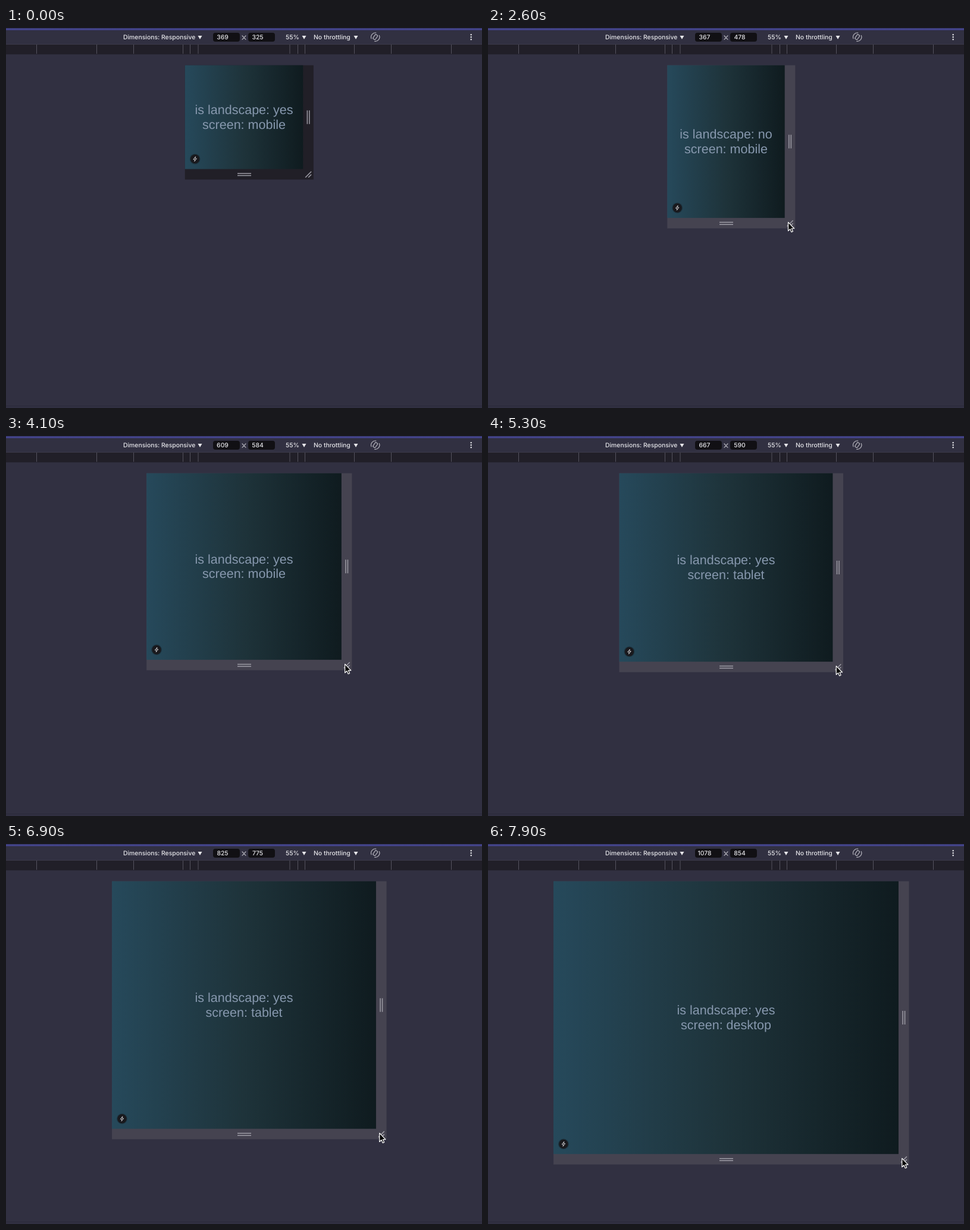
Write an HTML page that moves like this. It is 800 by 640 pixels and loops after 8000 ms.

```html
<!DOCTYPE html>
<html lang="en">
<head>
<meta charset="utf-8">
<title>Responsive viewport</title>
<style>
  html, body { margin: 0; width: 100%; height: 100%; overflow: hidden; background: #313041; }
  svg { display: block; width: 800px; height: 640px; }
  text { text-rendering: geometricPrecision; }
  .ui { font: 500 10.4px Inter, Roboto, sans-serif; fill: #e6e6ea; }
  .mid { text-anchor: middle; }
  .msg { font: 21.52px "Liberation Sans", Arial, sans-serif; fill: #8798ae; text-anchor: middle; }
  .grip { stroke: #9d9ca5; stroke-width: 1.5; fill: none; }
  .icon { stroke: #b4b3bc; stroke-width: 1.2; fill: none; stroke-linecap: round; }
</style>
</head>
<body>
<svg viewBox="0 0 800 640">
  <defs>
    <linearGradient id="strip" x2="0" y2="1">
      <stop offset="0" stop-color="#303058"/>
      <stop offset=".55" stop-color="#4a4b9c"/>
      <stop offset="1" stop-color="#353562"/>
    </linearGradient>
    <linearGradient id="page">
      <stop offset="0" stop-color="#26495b"/>
      <stop offset=".5" stop-color="#1e333a"/>
      <stop offset="1" stop-color="#0f1b1f"/>
    </linearGradient>
  </defs>

  <rect width="800" height="640" fill="#313041"/>
  <rect y="636" width="800" height="1" fill="#2b2a39"/>
  <rect width="800" height="4" fill="url(#strip)"/>
  <rect y="27" width="800" height="17.4" fill="#211f28"/>
  <rect y="27" width="800" height="1" fill="#3b3a48"/>
  <path id="ticks" stroke="#55535f"/>

  <rect x="348" y="8" width="45" height="15" rx="4" fill="#111014"/>
  <rect x="407" y="8" width="45" height="15" rx="4" fill="#111014"/>
  <g class="ui">
    <text x="197" y="19">Dimensions: Responsive</text>
    <text x="470" y="19">55%</text>
    <text x="517" y="19">No throttling</text>
    <text id="wNum" class="mid" x="364" y="19"></text>
    <text id="hNum" class="mid" x="423" y="19"></text>
    <path d="M322.5 13h7l-3.5 6zM497.5 13h7l-3.5 6zM584.5 13h7l-3.5 6z"/>
    <circle cx="781.7" cy="11.2" r="1.2"/>
    <circle cx="781.7" cy="15.2" r="1.2"/>
    <circle cx="781.7" cy="19.2" r="1.2"/>
  </g>
  <path class="icon" d="M397 13l6 6.4M403 13l-6 6.4"/>
  <g class="icon" transform="translate(620.7 15.2)">
    <rect x="-2.3" y="-4.3" width="4.6" height="8.6" rx="1" transform="rotate(35)"/>
    <path d="M1 -7.1A7.2 7.2 0 0 0 -6.7 2.6M-1 7.1A7.2 7.2 0 0 0 6.7 -2.6"/>
  </g>

  <path id="bars"/>
  <rect id="screen" fill="url(#page)"/>
  <text id="line1" class="msg" x="400"></text>
  <text id="line2" class="msg" x="400"></text>
  <g id="badge">
    <circle r="9" fill="#000" opacity=".22"/>
    <circle r="7.7" fill="#19191d"/>
    <path d="M.9 -4L-2.8 .7H-.2L-.9 4L2.8 -.7H.2Z" fill="none" stroke="#d5d5d9" stroke-width=".9" stroke-linejoin="round"/>
  </g>
  <path id="gripR" class="grip" d="M-1.7 -11.5v23M1.8 -11.5v23"/>
  <path id="gripB" class="grip" d="M-11 -1.7h23M-11 1.8h23"/>
  <path id="gripC" class="grip" d="M-5.3 5L4.7 -5M-.3 5L4.7 0"/>
  <path id="cursor" d="M0 0V14.6L3.3 11.5L5.5 16.5L7.9 15.4L5.7 10.6H10.2Z"
    fill="#050506" stroke="#fff" stroke-width="1.2" stroke-linejoin="round"/>
</svg>
<script>
const $ = id => document.getElementById(id);
const LOOP = 8000, STEP = 100;
const SCALE = 0.538, TOP = 62.7, BAR = 17.6, MID = 400;
const ENTER = 100, HOVER = 500, GRAB = 700;

const easeIn = p => p ** 1.3;
const easeOut = p => 1 - (1 - p) ** 1.3;
const smooth = p => p * p * (3 - 2 * p);
const progress = (t, from, to) => Math.min(1, Math.max(0, (t - from) / (to - from)));

// each drag resizes the viewport to w x h
const drags = [
  { from: 800, to: 900, w: 369, h: 326, ease: smooth },
  { from: 1580, to: 3100, w: 366, h: 530, ease: smooth },
  { from: 3200, to: 3500, w: 506, h: 572, ease: easeIn },
  { from: 3500, to: 4600, w: 667, h: 590, ease: easeOut },
  { from: 5280, to: 6100, w: 663, h: 724, ease: smooth },
  { from: 6300, to: 7300, w: 978, h: 824, ease: easeIn },
  { from: 7300, to: 7900, w: 1078, h: 854, ease: easeOut }
];

function sizeAt(t) {
  let w = 369, h = 325;
  for (const d of drags) {
    const p = d.ease(progress(t, d.from, d.to));
    w += (d.w - w) * p;
    h += (d.h - h) * p;
  }
  return [Math.round(w), Math.round(h)];
}

function set(id, attrs) {
  for (const name in attrs) $(id).setAttribute(name, attrs[name]);
}
const move = (id, x, y) => set(id, { transform: `translate(${x} ${y})` });

function draw(t) {
  const [w, h] = sizeAt(t);
  const vw = w * SCALE, vh = h * SCALE;
  const left = MID - vw / 2, right = MID + vw / 2;
  const bottom = TOP + vh, center = TOP + vh / 2;

  $('wNum').textContent = w;
  $('hNum').textContent = h;
  $('line1').textContent = 'is landscape: ' + (w >= h ? 'yes' : 'no');
  $('line2').textContent = 'screen: ' + (w < 640 ? 'mobile' : w < 1024 ? 'tablet' : 'desktop');
  set('line1', { y: center - 5 });
  set('line2', { y: center + 19.7 });

  set('bars', {
    d: `M${left} ${TOP}H${right + BAR}V${bottom + BAR}H${left}Z`,
    fill: t < HOVER ? '#211f27' : '#454350'
  });
  set('screen', { x: left, y: TOP, width: vw, height: vh });
  move('badge', left + 16.9, bottom - 16.9);
  move('gripR', right + 8.8, center);
  move('gripB', MID, bottom + 9.2);
  move('gripC', right + 9.2, bottom + 9.2);

  const away = 1 - smooth(progress(t, ENTER, GRAB));
  move('cursor', right + 5.8 + 40 * away, bottom + 7.3 - 5 * away);
  set('cursor', { visibility: t < ENTER ? 'hidden' : 'visible' });
}

set('ticks', {
  d: [77, 90.5, 102.5, 185.5, 247.5, 348.5]
    .map(x => `M${MID - x} 28v15.5M${MID + x} 28v15.5`).join('')
});

const start = performance.now();
function tick(now) {
  const t = Math.max(0, now - start) % LOOP;
  draw(Math.floor(t / STEP) * STEP);
  requestAnimationFrame(tick);
}
draw(0);
requestAnimationFrame(tick);
</script>
</body>
</html>
```
